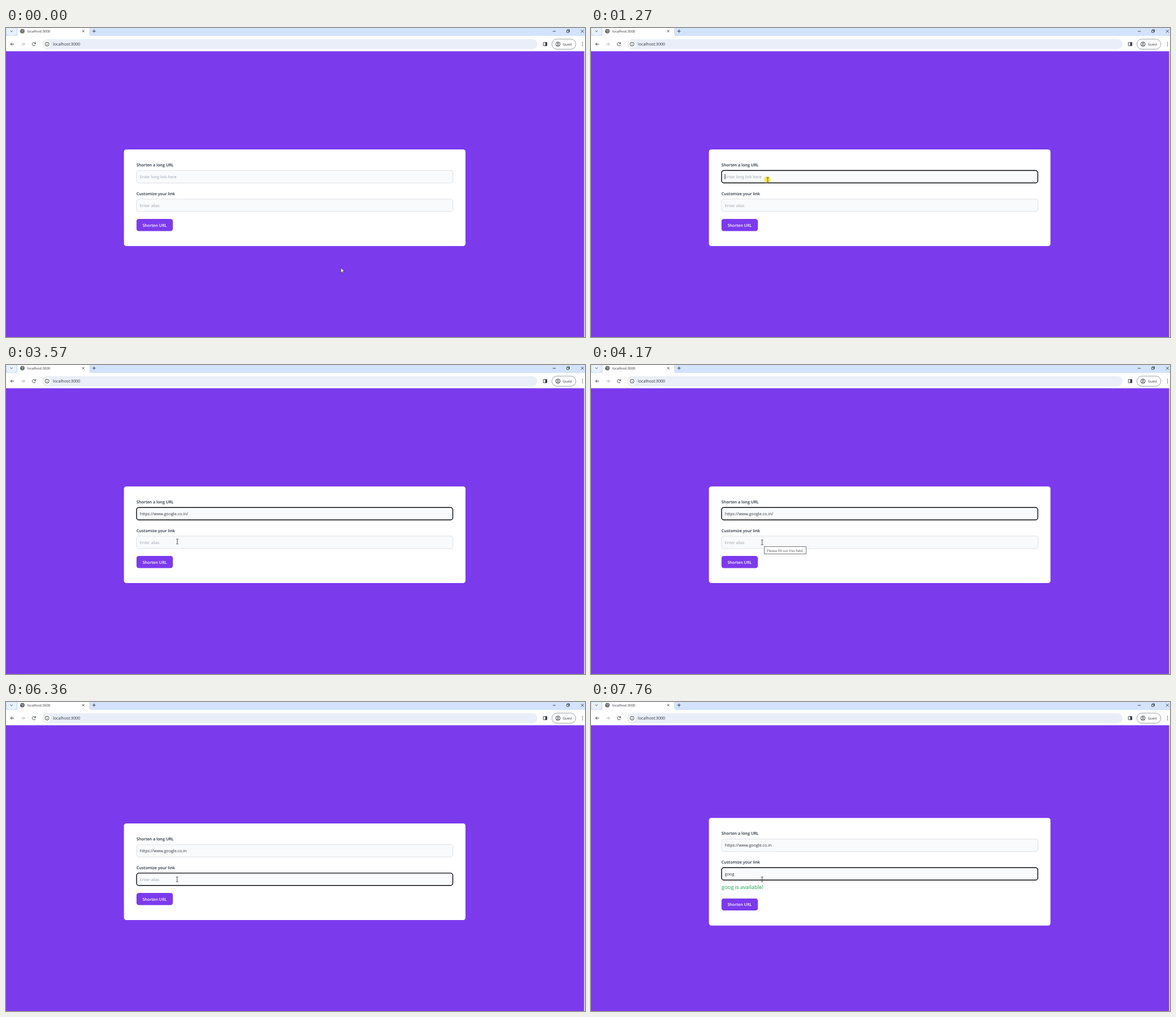
An HTML page that plays this animation: 1024x547 px, repeating every 8 s.

```html
<!DOCTYPE html>
<html lang="en">
<head>
<meta charset="utf-8">
<title>Shorten a long URL</title>
<style>
html, body { margin: 0; width: 100%; height: 100%; overflow: hidden; background: #7c3aed; }
svg { display: block; width: 100vw; height: 100vh; }
text { font: 7.15px "Open Sans", "Noto Sans", sans-serif; fill: #2b313b; text-rendering: geometricPrecision; white-space: pre; }
.chrome-text { font-size: 6px; fill: #2f3237; }
.label { font-weight: 600; fill: #1f2937; }
.hint { fill: #9ca3af; }
.line { fill: none; stroke: #30343a; stroke-width: .9; }
.field { fill: #f9fafb; stroke: #d1d5db; stroke-width: .7; }
.ring { fill: none; stroke: #0c0d10; stroke-width: 1.4; }

/* 8 s loop, hard changes: 1 % = 80 ms */
.anim { animation: 8s step-end infinite; }
.hidden { visibility: hidden; }

#url-hint { animation-name: url-hint; }
@keyframes url-hint { 31.875%, to { visibility: hidden } }
#url { animation-name: url; }
@keyframes url { 31.875%, to { visibility: visible } }
#slash { animation-name: slash; }
@keyframes slash { 31.875% { visibility: visible } 62% { visibility: hidden } }
#url-ring { animation-name: url-ring; }
@keyframes url-ring { 15.875% { visibility: visible } 72.875% { visibility: hidden } }

#alias-ring { animation-name: alias-ring; }
@keyframes alias-ring { 72.875%, to { visibility: visible } }
#alias-hint { animation-name: alias-hint; }
@keyframes alias-hint { 82%, to { visibility: hidden } }
#key1 { animation-name: key1; }
@keyframes key1 { 82%, to { visibility: visible } }
#key2 { animation-name: key2; }
@keyframes key2 { 87%, to { visibility: visible } }
#key3 { animation-name: key3; }
@keyframes key3 { 88.625%, to { visibility: visible } }
#key4 { animation-name: key4; }
@keyframes key4 { 90.5%, to { visibility: visible } }

#tip { animation-name: tip; }
@keyframes tip { 51.25% { visibility: visible } 62% { visibility: hidden } }
#press { animation-name: press; }
@keyframes press { 15.875% { visibility: visible } 17.5% { visibility: hidden } }
#note { animation-name: note; }
@keyframes note { 97%, to { visibility: visible } }

#card { animation-name: grow; }
@keyframes grow { 97%, to { y: 205.3px; height: 190.4px } }
#fields { animation-name: lift; }
@keyframes lift { 97%, to { transform: translateY(-9.6px) } }
#button { animation-name: drop; }
@keyframes drop { 97%, to { transform: translateY(9.6px) } }

#caret { animation-name: caret; }
@keyframes caret {
  0% { opacity: 0 }
  15.875%, 29.125% { opacity: 1; transform: translate(236.4px, 258.4px) }
  22.5% { opacity: 0; transform: translate(236.4px, 258.4px) }
  31.875%, 45.5%, 57.875% { opacity: 1; transform: translate(322.7px, 258.4px) }
  38.5%, 52.125% { opacity: 0; transform: translate(322.7px, 258.4px) }
  62%, 71.125% { opacity: 1; transform: translate(319.7px, 258.4px) }
  64.5% { opacity: 0; transform: translate(319.7px, 258.4px) }
  72.875% { opacity: 1; transform: translate(236.4px, 309px) }
  79.5% { opacity: 0; transform: translate(236.4px, 309px) }
  82% { opacity: 1; transform: translate(241px, 309px) }
  87% { opacity: 1; transform: translate(245.4px, 309px) }
  88.625% { opacity: 1; transform: translate(249.8px, 309px) }
  90.5% { opacity: 1; transform: translate(254.3px, 309px) }
  97%, to { opacity: 0 }
}

#pointer { animation-name: travel; }
@keyframes travel {
  0% { transform: translate(592.2px, 424.5px) }
  .875% { transform: translate(594px, 424.5px) }
  1.625% { transform: translate(596px, 425px) }
  2.375% { transform: translate(597.5px, 425px) }
  7.375% { transform: translate(597.5px, 425px); animation-timing-function: steps(3, start) }
  9.875% { transform: translate(520px, 396px); animation-timing-function: steps(3, start) }
  12.5% { transform: translate(370px, 310px); animation-timing-function: steps(3, start) }
  15% { transform: translate(312.5px, 269px) }
  36.75% { transform: translate(309.7px, 278.7px); animation-timing-function: steps(5, end) }
  41.25% { transform: translate(305.6px, 298px) }
  44.625% { transform: translate(303px, 312.5px) }
  45.5%, to { transform: translate(302.6px, 314px) }
}
#arrow { animation-name: arrow; }
@keyframes arrow { 14.17% { visibility: hidden } 36.75% { visibility: visible } 44.625%, to { visibility: hidden } }
#beam { animation-name: beam; }
@keyframes beam { 14.17% { visibility: visible } 36.75% { visibility: hidden } 44.625%, to { visibility: visible } }
</style>
</head>
<body>
<svg viewBox="0 0 1024 547" preserveAspectRatio="none">
  <rect width="1024" height="547" fill="#7c3aed"/>
  <rect x="1022.4" y="41" width="1.6" height="506" fill="#e9e2f8"/>

  <!-- tab strip -->
  <rect width="1024" height="14.5" fill="#d3e3fd"/>
  <rect x="1.5" y="-4" width="16.5" height="17" rx="4.5" fill="#e9f1fe"/>
  <path d="M16 14.5q4.5 0 4.5-4.5V-1H147V10q0 4.5 4.5 4.5z" fill="#fff"/>
  <path class="line" d="M7.6 4.6l2.1 2.1 2.1-2.1"/>
  <circle cx="29" cy="5.6" r="3.9" fill="#50545a"/>
  <path d="M26.2 4.4l2.4.6.6 1.5-1 1.9M29.4 2.7l.3 1.6 2.1.8M30.4 7.8l1.4-.9" fill="none" stroke="#e4e6ea" stroke-width=".9"/>
  <text class="chrome-text" x="37.8" y="8">localhost:3000</text>
  <path class="line" d="M134.7 3.7l3.8 3.8m0-3.8l-3.8 3.8M152.7 5.6h6m-3-3v6"/>
  <path class="line" d="M967 5.9h5.2M1017 3.3l4.8 4.8m0-4.8l-4.8 4.8" stroke-width=".7"/>
  <path class="line" d="M991.7 4.2h3.7v3.7h-3.7zM992.8 4V3h3.7v3.8h-1" stroke-width=".7"/>

  <!-- toolbar -->
  <rect y="14" width="1024" height="27.2" fill="#fff"/>
  <path class="line" d="M14.2 28.6H8.2m2.8-2.9l-2.9 2.9 2.9 2.9"/>
  <path class="line" d="M27 28.6h6m-2.8-2.9l2.9 2.9-2.9 2.9" style="stroke:#a9acb0"/>
  <path class="line" d="M51.9 27.2a2.9 2.9 0 1 0 .1 2.5M52.4 25.2v2.5h-2.5"/>
  <rect x="64" y="19.8" width="876" height="17.6" rx="8.8" fill="#e9eef8"/>
  <circle cx="72.6" cy="28.6" r="6.4" fill="#fff"/>
  <circle class="line" cx="72.6" cy="28.6" r="3.5"/>
  <path class="line" d="M72.6 28.2v2.3m0-4.1v.9"/>
  <text x="83" y="31.2">localhost:3000</text>
  <rect class="line" x="950.3" y="25.6" width="6.4" height="5.8" rx=".5"/>
  <rect x="953.7" y="25.6" width="3" height="5.8" fill="#30343a"/>
  <rect x="965.4" y="19.7" width="42.4" height="17.8" rx="8.9" fill="#fff" stroke="#74777b" stroke-width=".7"/>
  <circle class="line" cx="976.2" cy="28.6" r="3.9"/>
  <circle class="line" cx="976.2" cy="27.5" r="1.3"/>
  <path class="line" d="M973.5 31.2q2.7-1.9 5.4 0"/>
  <text class="chrome-text" x="984.7" y="30.9">Guest</text>
  <path d="M1019.6 25.6v.01m0 2.99v.01m0 2.99v.01" stroke="#30343a" stroke-width="1.5" stroke-linecap="round"/>

  <!-- form -->
  <rect id="card" class="anim" x="208.6" y="214.9" width="604" height="171.2" rx="4.2" fill="#fff"/>
  <g id="fields" class="anim">
    <text class="label" x="230.8" y="244.8">Shorten a long URL</text>
    <rect class="field" x="230.8" y="252.2" width="559.7" height="22.2" rx="4.2"/>
    <rect id="url-ring" class="ring anim hidden" x="230.9" y="252.3" width="559.3" height="21.9" rx="4.2"/>
    <text id="url-hint" class="hint anim" x="236.8" y="266.1">Enter long link here</text>
    <text id="url" class="anim hidden" x="236.8" y="266.1">https://www.google.co.in<tspan id="slash" class="anim hidden">/</tspan></text>

    <text class="label" x="230.8" y="295.5">Customize your link</text>
    <rect class="field" x="230.8" y="302.8" width="559.7" height="22.2" rx="4.2"/>
    <rect id="alias-ring" class="ring anim hidden" x="230.9" y="302.9" width="559.3" height="21.9" rx="4.2"/>
    <text id="alias-hint" class="hint anim" x="236.8" y="316.6">Enter alias</text>
    <text x="236.8" y="316.6"><tspan id="key1" class="anim hidden">g</tspan><tspan id="key2" class="anim hidden">o</tspan><tspan id="key3" class="anim hidden">o</tspan><tspan id="key4" class="anim hidden">g</tspan></text>
  </g>
  <text id="note" class="anim hidden" x="230.8" y="331.2" style="font-size:9.35px;fill:#16a34a">goog is available!</text>
  <g id="button" class="anim">
    <rect x="230.8" y="338.1" width="64.3" height="21.4" rx="4.2" fill="#7c3aed"/>
    <text class="label" x="241.4" y="351.5" style="fill:#fff">Shorten URL</text>
  </g>
  <rect id="caret" class="anim" width=".8" height="9.4" fill="#111"/>

  <g id="tip" class="anim hidden">
    <rect x="306.6" y="321.6" width="73.8" height="12.8" fill="#fff" stroke="#555" stroke-width=".8"/>
    <text x="310.8" y="330.5" style="font-size:6.08px;fill:#555">Please fill out this field.</text>
  </g>

  <g id="pointer" class="anim">
    <circle id="press" class="anim hidden" cx="-.7" cy="-.4" r="6" fill="#f2e21c" fill-opacity=".75"/>
    <path id="arrow" class="anim" d="M0 0V8.7L2 6.8 3.3 9.8 4.7 9.2 3.4 6.3H6.1Z" fill="#fff" stroke="#15151a" stroke-width=".6"/>
    <path id="beam" class="line anim hidden" d="M-2-4.2H-.6L0-3.7.6-4.2H2M0-3.7V3.7M-2 4.2H-.6L0 3.7.6 4.2H2"/>
  </g>
</svg>
</body>
</html>
```
